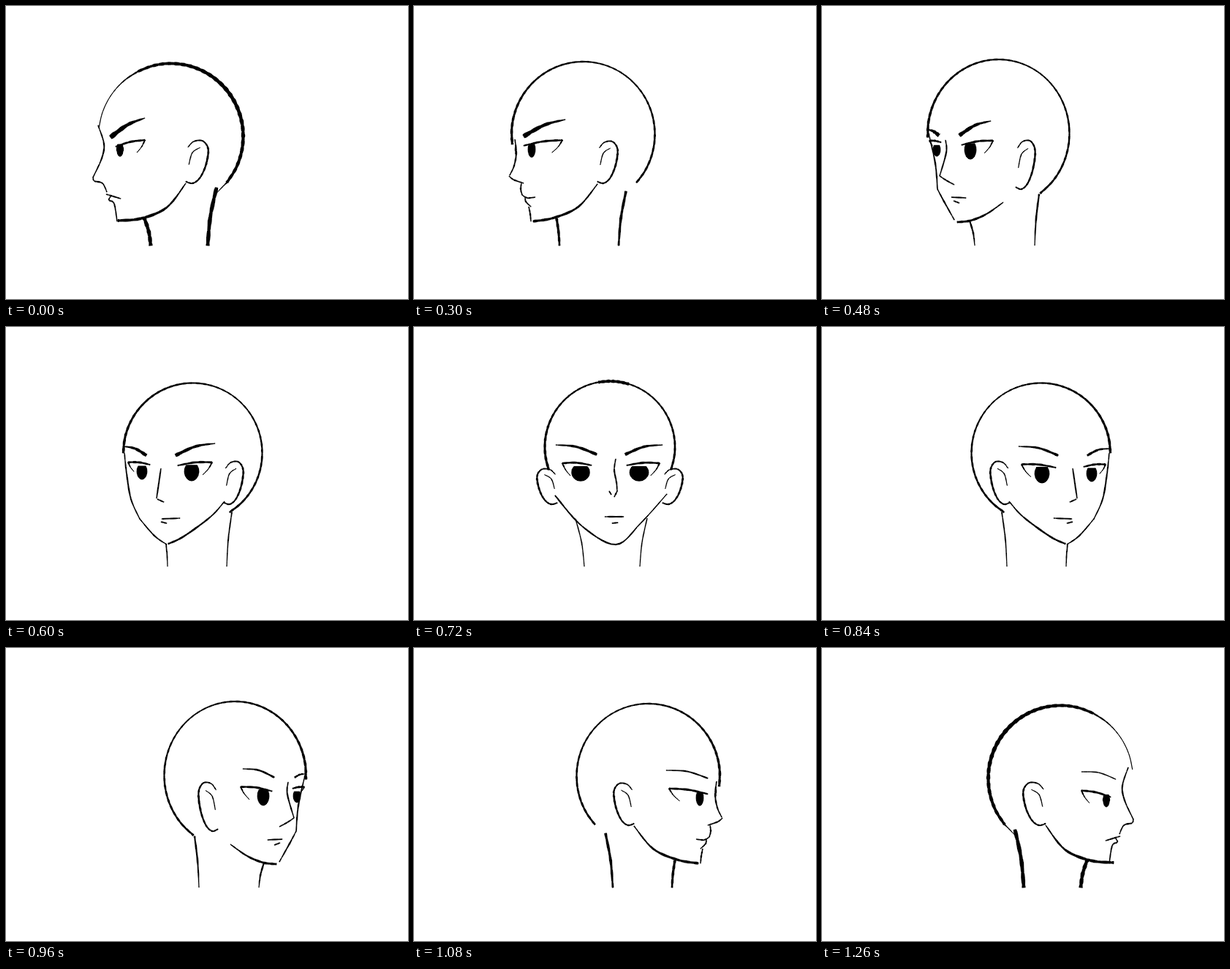
An HTML page that plays this animation: 550 by 400 pixels, repeating every 1560 ms.

```html
<!DOCTYPE html>
<html lang="en">
<head>
<meta charset="utf-8">
<title>Head turn</title>
<style>
html, body { margin: 0; width: 100%; height: 100%; overflow: hidden; background: #fff; }
svg { display: block; width: 550px; height: 400px; }
.pose { opacity: 0; stroke: #000; stroke-width: .8; stroke-linejoin: round; shape-rendering: crispEdges; }
</style>
</head>
<body>
<svg id="stage" viewBox="0 0 550 400"></svg>
<script>
// Left-facing views from profile to front; the right-facing half of the turn mirrors them.
// skull: cx cy rx ry, arc from-to in degrees. ear: box. neck: front x y, foot x; back x y, foot x.
// eyes: brow inner/outer x, lid inner/outer x, iris x rx ry. flip: mirror sums for head and face.
const views = [
  {
    skull: [225.5, 178, 99, 99.5], arc: [-117, 39], ear: [246, 184, 30, 58],
    neck: [189, 289, 198, 288, 248, 276], flip: [552, 545],
    jaw: '153 293 185 290 220 275 246 242',
    eyes: [[143, 190, 150, 190, 156, 4.5, 10]],
    lines: ['126 163 134 188 131 208 119 234', '119 234 121 239 132 242 138 254',
      '137 257 147 260 157 263', '143 260 141 265 148 270 152 294']
  },
  {
    skull: [231.5, 175, 98, 99], arc: [-188, 42], ear: [251, 185, 27, 57],
    neck: [195, 290, 199, 290, 253, 280], flip: [552, 552],
    jaw: '163 294 192 289 225 274 251 243',
    eyes: [[150, 207, 150, 203, 161, 5, 11]],
    lines: ['138 182 140 200 137 218 131 231', '130 232 136 237 150 242', '147 242 146 250 148 258',
      '148 258 155 262 166 261', '152 261 153 267 160 274', '157 274 159 284 160 294', '139 189 139 202']
  },
  {
    skull: [241.5, 174, 97, 101], arc: [-183, 54], ear: [265, 184, 26, 66],
    neck: [202, 293, 209, 297, 257, 291], flip: [555, 555],
    jaw: '185 295 203 293 225 284 248 268',
    eyes: [[188, 231, 191, 234, 203, 8, 13], [160, 145, 163, 147, 157, 5, 9]],
    lines: ['146 174 155 215 158 250', '158 250 167 267 181 292', '169 183 170 200 161 232',
      '161 232 170 238 181 244', '177 261 197 262', '180 266 188 269']
  },
  {
    skull: [255.5, 172, 95, 95.5], arc: [-180, 58], ear: [298, 184, 26, 58],
    neck: [219, 297, 221, 309, 253, 302], flip: [555, 555],
    jaw: '222 296 243 286 280 259 299 238',
    eyes: [[232, 286, 235, 282, 254, 10, 13], [192, 162, 197, 167, 186, 7, 11]],
    lines: ['162 172 165 200 171 235 183 262', '183 262 203 285 220 297', '212 193 206 234',
      '207 235 216 239', '213 262 238 261', '212 266 220 268']
  },
  {
    skull: [268, 164, 89, 90], arc: [-200, 20], ear: [340, 194, 27, 48],
    neck: [221, 262, 233, 319, 261, 309],
    jaw: '193 230 230 272 276 297 310 268 346 228',
    eyes: [[289, 340, 291, 336, 308, 13, 12], [250, 194, 243, 203, 228, 12.5, 12]],
    lines: ['276 180 274 195 277 212 278 224', '278 224 274 232', '267 224 270 229',
      '261 259 287 259', '271 268 279 267']
  }
];
const earRim = '.1 .15 .35 .02 .75 0 1 .15 1 .38 .85 .67 .6 .9 .3 1 0 .96';
const earFold = '.65 .16 .3 .28 .14 .56';
const holds = [300, 180, 120, 120, 120, 120, 120, 180, 300];

const nums = s => s.split(' ').map(Number);

function catmull(p0, p1, p2, p3, t) {
  return p1 + t / 2 * (p2 - p0 + t * (2 * p0 - 5 * p1 + 4 * p2 - p3 + t * (3 * (p1 - p2) + p3 - p0)));
}

// Uneven brush line through the points; widths at its start, middle and end.
function ink([a, b, c], pts) {
  const n = pts.length / 2, steps = (n - 1) * 7;
  const at = u => {
    const i = Math.min(n - 2, Math.floor(u * (n - 1)));
    const axis = k => catmull(...[-1, 0, 1, 2].map(d =>
      pts[2 * Math.max(0, Math.min(n - 1, i + d)) + k]), u * (n - 1) - i);
    return [axis(0), axis(1)];
  };
  const one = [], two = [];
  for (let i = 0; i <= steps; i++) {
    const u = i / steps, [x, y] = at(u);
    const [x0, y0] = at(Math.max(0, u - .01)), [x1, y1] = at(Math.min(1, u + .01));
    const len = Math.hypot(x1 - x0, y1 - y0) || 1;
    const w = u < .5 ? a + (b - a) * u * 2 : b + (c - b) * (u * 2 - 1);
    const h = Math.max(.1, w * (1 + .15 * Math.sin(i * 1.9 + pts[0])) - .8) / 2;
    const dx = (y0 - y1) / len * h, dy = (x1 - x0) / len * h;
    one.push([x + dx, y + dy]);
    two.unshift([x - dx, y - dy]);
  }
  return 'M' + [...one, ...two].map(p => p.map(v => v.toFixed(1)).join(' ')).join('L') + 'Z';
}

function arc(widths, [cx, cy, rx, ry], from, to) {
  const pts = [], n = Math.ceil((to - from) / 12);
  for (let i = 0; i <= n; i++) {
    const a = (from + (to - from) * i / n) * Math.PI / 180;
    pts.push(cx + rx * Math.cos(a), cy + ry * Math.sin(a));
  }
  return ink(widths, pts);
}

function ear([x, y, w, h]) {
  const place = s => nums(s).map((v, i) => i % 2 ? y + v * h : x + v * w);
  return [ink([1.5, 2.8, 2], place(earRim)), ink([1, 1.6, 1], place(earFold))];
}

function neck([fx, fy, foot, bx, by, backFoot], w) {
  const side = (x, y, end) =>
    ink([w, w, Math.max(1, w * 1.6 - 3)], [x, y, x + (end - x) * .7, (y + 327) / 2, end, 327]);
  return [side(fx, fy, foot), side(bx, by, backFoot)];
}

// Brows thin out and flatten over the turn while the lids sink.
function eye([b0, b1, l0, l1, x, rx, ry], step) {
  const turn = Math.abs(step - 4);
  const scale = Math.min(1, Math.abs(l1 - l0) / 40);
  const brow = 174 + 1.3 * turn, lift = (brow - 153 - 2 * step) * scale;
  const lid = 183 + .18 * step * step, slant = (3 + 1.5 * turn) * scale;
  const top = lid + 12.5 - ry * .66, cut = rx * .75;
  const lash = (l0 - l1) * .27;
  return [
    ink([7 - step * .7, 5 - step * .42, 1.3],
      [b0, brow, (b0 + b1) / 2, brow - lift / 2 - 4 * scale, b1, brow - lift]),
    ink([2, 3, 2.5], [l0, lid + slant, (l0 + l1) / 2, lid + slant / 2 - 2 * scale, l1, lid]),
    ink([2.5, 1.5, 1], [l1, lid, l1 + lash * .4, lid + 9 * scale, l1 + lash, lid + 17 * scale]),
    `M${x - cut} ${top}A${rx} ${ry} 0 1 0 ${x + cut} ${top}Z`
  ];
}

const NS = 'http://www.w3.org/2000/svg';
function add(parent, tag, attrs = {}) {
  const el = parent.appendChild(document.createElementNS(NS, tag));
  for (const name in attrs) el.setAttribute(name, attrs[name]);
  return el;
}
const layer = (parent, paths, sum) =>
  add(parent, 'path', { d: paths.join(''), ...(sum && { transform: `matrix(-1 0 0 1 ${sum} 0)` }) });

function drawPose(g, step) {
  const turn = Math.abs(step - 4), view = views[4 - turn];
  const { skull, arc: [from, to], flip } = view;
  const [headFlip, faceFlip] = step > 4 ? flip : [];
  const weight = 1.5 + .22 * turn * turn;
  const jaw = 2.2 + turn * .4;
  const head = [
    ...neck(view.neck, weight),
    ink([jaw, jaw, 1.5], nums(view.jaw))
  ];
  if (turn === 4) {
    head.push(arc([1, 1.2, 2.5], skull, -173, from), arc([3.5, 5.5, 4], skull, from, to),
      arc([2.5, 1.5, 1], skull, to, 50));
  } else {
    head.push(arc([3.5, 2, 3], skull, from, to));
  }
  layer(g, head, headFlip);
  layer(g, ear(view.ear), headFlip);
  if (!turn) {
    layer(g, ear(view.ear), 536);
    layer(g, [arc([4, 4, 4], skull, -100, -73)]);
  }
  layer(g, view.lines.map(s => ink([1.5, 2.2, 1.5], nums(s))), faceFlip);
  for (const e of view.eyes)
    for (const path of eye(e, step)) layer(g, [path], faceFlip);
}

const stage = document.getElementById('stage');
const duration = holds.reduce((a, b) => a + b);
let start = 0;
holds.forEach((ms, step) => {
  const g = add(stage, 'g', { class: 'pose' });
  drawPose(g, step);
  const end = start + ms, keys = [];
  if (start) keys.push({ opacity: 0, offset: 0 });
  keys.push({ opacity: 1, offset: start / duration });
  if (end < duration) keys.push({ opacity: 0, offset: end / duration });
  keys.push({ opacity: end < duration ? 0 : 1, offset: 1 });
  g.animate(keys.map(k => ({ ...k, easing: 'step-end' })), { duration, iterations: Infinity });
  start = end;
});
</script>
</body>
</html>
```
